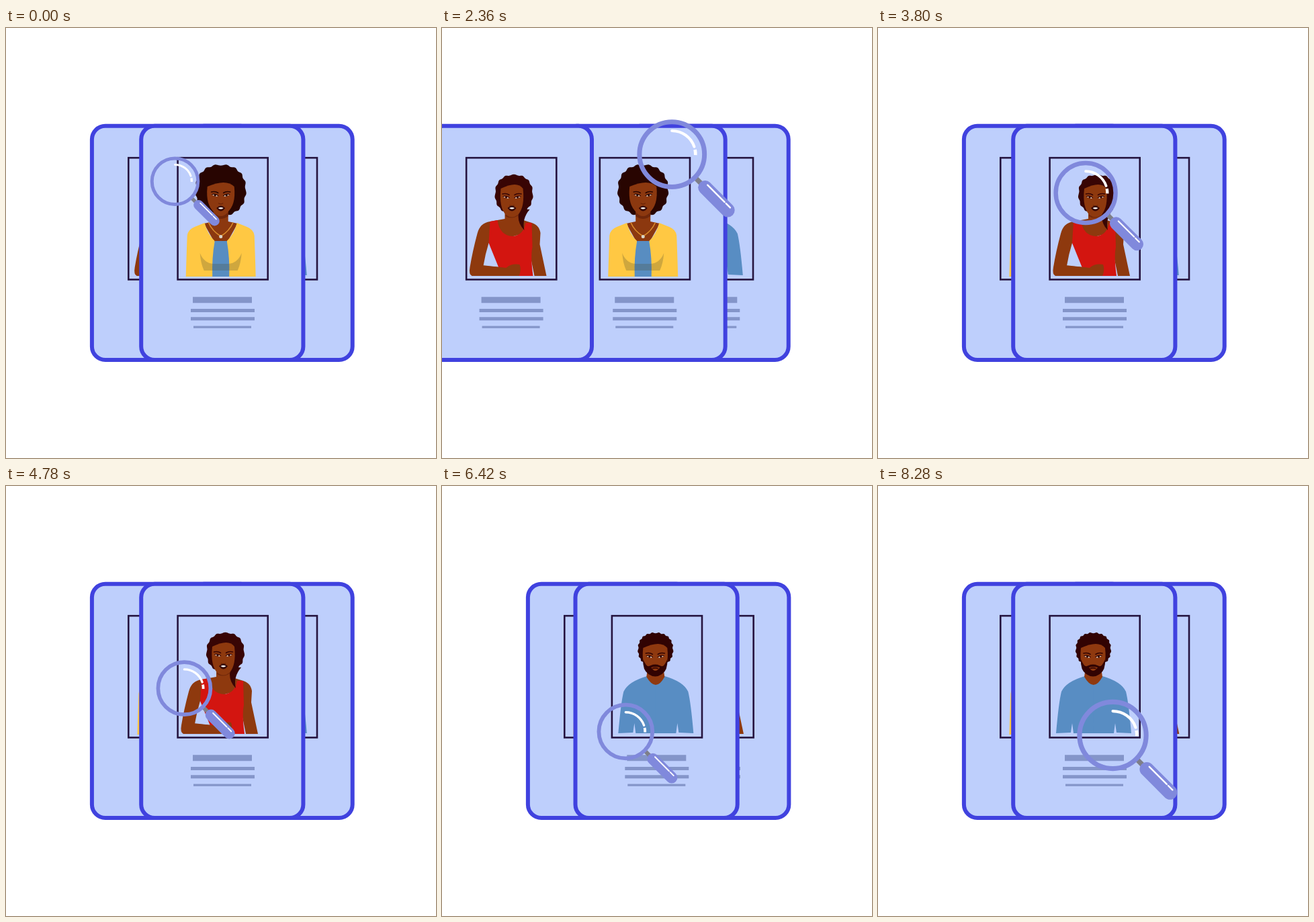
These frames come from a looping animation (640 by 640 pixels, 8480 ms). An HTML page with a canvas:

```html
<!DOCTYPE html>
<html lang="en">
<head>
<meta charset="utf-8">
<title>Profile search</title>
<style>
  html, body { margin: 0; width: 100%; height: 100%; overflow: hidden; background: #fff; }
  canvas { display: block; width: 100%; height: 100%; }
</style>
</head>
<body>
<canvas id="stage" width="640" height="640"></canvas>
<script>
const ctx = document.getElementById('stage').getContext('2d');

const LOOP = 8480;
const SIDE = 73.3;   // resting offset of the cards behind
const AWAY = 306;    // offset of a card pulled clear of the stack
const RED_OUT = 1440, RED_IN = 2190, BLUE_OUT = 4900, BLUE_IN = 5660;

const mix = (a, b, p) => a + (b - a) * p;

// Slightly underdamped spring, peaking 900 ms after its start.
function spring(ms) {
  if (ms <= 0) return 0;
  const x = ms / 900 * Math.PI, damping = 1.3;
  return 1 - Math.exp(-damping * x) * (Math.cos(x) + damping * Math.sin(x));
}

function fill(color, path) {
  ctx.fillStyle = color;
  ctx.fill(new Path2D(path));
}

function line(color, width, path, cap = 'round') {
  ctx.strokeStyle = color;
  ctx.lineWidth = width;
  ctx.lineCap = cap;
  ctx.stroke(new Path2D(path));
}

function dot(color, x, y, r) {
  ctx.beginPath();
  ctx.arc(x, y, r, 0, 7);
  ctx.fillStyle = color;
  ctx.fill();
}

function at(x, y, paint) {
  ctx.save();
  ctx.translate(x, y);
  paint();
  ctx.restore();
}

function mirrored(paint) {
  for (const side of [-1, 1]) {
    ctx.save();
    ctx.scale(side, 1);
    paint();
    ctx.restore();
  }
}

// Rounded-square mass of hair with a wavy outline.
function curlyHair(color, x, y, rx, ry, waves) {
  const bulge = v => Math.sign(v) * Math.abs(v) ** 0.88;
  ctx.beginPath();
  for (let i = 0; i < 180; i++) {
    const a = i * Math.PI / 90;
    const r = 0.98 + 0.025 * Math.sin(waves * a);
    ctx.lineTo(x + rx * r * bulge(Math.cos(a)), y + ry * r * bulge(Math.sin(a)));
  }
  ctx.fillStyle = color;
  ctx.fill();
}

// Origin between the eyes; w is half the width of the head.
function face(skin, hair, w) {
  fill(skin, `M${-w} -13 Q8 -25 ${w} -13 Q${w + 3} 15 9 26 Q0 33 -9 26 Q${-w - 3} 15 ${-w} -13Z`);
  mirrored(() => {
    fill('#e6d8cd', 'M4 1 Q8 -3 13 -1 Q8 3 4 1Z');
    dot(hair, 8.5, 0, 1.7);
    line(hair, 1.2, 'M4 .5 Q8 -3.2 13 -1.3');
    line(hair, 1.6, 'M4 -3.5 Q8 -6.5 14 -5');
  });
  line('#6a2408', 1.4, 'M-3 12 Q0 14 3 12');
}

function mouth(y) {
  fill('#350805', `M-6.5 ${y} Q0 ${y - 7} 6.5 ${y} Q0 ${y + 9} -6.5 ${y}Z`);
  fill('#fff', `M-4 ${y} Q0 ${y - 2} 4 ${y} Q0 ${y + 3} -4 ${y}Z`);
}

function yellowPerson() {
  const hair = '#280501', skin = '#8c380f';
  curlyHair(hair, 319.6, 241.5, 38, 38.5, 17);
  at(319.7, 280, () => {
    fill(skin, 'M-11 -10 H11 V8 L25 11 L10 38 H-10 L-25 11 L-11 8Z');
    fill('#6f270a', 'M-11 -6 Q0 6 11 -6 V0 Q0 8 -11 0Z');
    mirrored(() => fill('#ffc843', 'M24 10 Q20 27 9 37 L12 90 H52 Q51 55 50 29 Q49 20 39 16Z'));
    fill('#588dc1', 'M-9 37 H9 Q13.5 62 12.5 90 H-12.5 Q-13.5 62 -9 37Z');
    fill('rgba(80,80,50,.27)', 'M-31 55 Q-25 70 -11 71 H11 Q25 70 31 55 Q30 70 25 81 H-25 Q-30 70 -31 55Z');
    mirrored(() => line('#d98b2c', 1.6, 'M18 10 Q13 22 0 30'));
    dot('#d8d5c8', 0, 30.5, 2.5);
  });
  at(319.7, 249, () => {
    face(skin, hair, 20);
    mouth(19);
  });
}

function redPerson() {
  const hair = '#380504', skin = '#8e390e';
  curlyHair(hair, 326.5, 247.5, 28.5, 29.5, 15);
  fill(skin, 'M313 268 H334 V284 L350 289 Q364 292 366 305 L365 322 L375 369 H357 L344 305 L289 320 Q284 336 281 354 L320 357 V369 H264 Q259 367 261 356 Q265 332 272 306 Q276 290 291 288 L313 284Z');
  fill('#d31510', 'M291 288 L302 286 Q305 309 325 310 Q341 308 344 290 L353 290 L354 326 Q351 340 355 369 H304 V357 L289 320Z');
  fill(skin, 'M279 353 L315 357 Q323 350 335 352 Q338 360 334 369 H264Z');
  fill('#6f270a', 'M314 272 Q324 283 334 272 V278 Q324 286 314 280Z');
  fill(hair, 'M335 270 H350 Q338 284 342 301 Q333 292 333 280Z');
  at(323.5, 252, () => {
    face(skin, hair, 16.5);
    mouth(16);
  });
}

function bluePerson() {
  const hair = '#310302', skin = '#8f390f';
  at(321, 283, () => mirrored(() =>
    fill('#588dc3', 'M-.5 8 L13 0 Q41 8 48 23 Q52 39 56 85 L34 84 L32 70 L30 85 H-.5Z')));
  fill(skin, 'M309 270 H332 L334 284 Q321 308 307 284Z');
  curlyHair(hair, 320.5, 243.5, 26.5, 25.5, 21);
  at(320, 254, () => {
    face(skin, hair, 18);
    fill(hair, 'M-18 4 Q-13 16 -9 14 Q0 9 9 14 Q13 16 18 4 Q19 20 10 26 Q0 33 -10 26 Q-19 20 -18 4Z');
    fill(skin, 'M-6 16 Q0 14 7 16 Q0 26 -6 16Z');
    line('#3c0904', 1.8, 'M-4 17.5 Q0 16 4 17.5');
  });
}

function card(offset, person, nudge) {
  at(offset, 0, () => {
    ctx.beginPath();
    ctx.roundRect(201.2, 145.8, 241.2, 348.2, 20);
    ctx.fillStyle = '#becffc';
    ctx.fill();
    ctx.strokeStyle = '#4042df';
    ctx.lineWidth = 6;
    ctx.stroke();
    at(nudge, 0, person);
    ctx.strokeStyle = '#25143f';
    ctx.lineWidth = 2.6;
    ctx.strokeRect(255.6, 193.2, 134.1, 181.2);
    line('#8495c9', 9, 'M278 404.8 H366', 'butt');
    line('#8495c9', 5, 'M275 420.5 H370 M275 432.8 H370', 'butt');
    line('#8495c9', 3.2, 'M279 445.2 H365', 'butt');
  });
}

// The lens sweeps between these points; bow curves the leg that follows.
const waypoints = [
  { time: 0, x: 251.5, y: 228.3, r: 36.8, bow: -4 },
  { time: 2720, x: 355, y: 184, r: 54.2, bow: 0 },
  { time: 5490, x: 232.5, y: 341.5, r: 37.6, bow: 16 },
  { time: 8280, x: 349.5, y: 371, r: 53.2 }
];

function lens(t) {
  const next = Math.max(1, waypoints.findIndex(w => w.time > t));
  const leg = t >= 8280 ? 3 : next;
  const a = waypoints[leg - 1], b = waypoints[leg];
  const p = Math.min(1, (t - a.time) / (b.time - a.time));
  const arch = 4 * p * (1 - p);
  const r = mix(a.r, b.r, p);

  ctx.save();
  ctx.translate(mix(a.x, b.x, p) + 2 * arch, mix(a.y, b.y, p) + a.bow * arch);
  ctx.scale(r, r);
  line('#7e7f88', 0.14, 'M.68 .68 L.86 .86', 'butt');
  line('#8089dc', 0.4, 'M.95 .95 L1.6 1.6');
  line('#fff', 0.045, 'M1.02 .88 L1.51 1.37 M1.55 1.41 L1.67 1.53');
  const arc = (color, width, radius, from, to, cap = 'butt') => {
    ctx.beginPath();
    ctx.arc(0, 0, radius, from, to);
    ctx.strokeStyle = color;
    ctx.lineWidth = width;
    ctx.lineCap = cap;
    ctx.stroke();
  };
  arc('#8089dc', 0.135, 0.932, 0, 2 * Math.PI);
  arc('#fff', 0.08, 0.675, -1.57, -0.33, 'round');
  arc('#fff', 0.09, 0.675, -0.2, 0.03);
  ctx.restore();
}

function draw(t) {
  const redOut = spring(t - RED_OUT), redIn = spring(t - RED_IN);
  const blueOut = spring(t - BLUE_OUT), blueIn = spring(t - BLUE_IN);
  const redX = t < RED_IN ? mix(-SIDE, -AWAY, redOut) : mix(-AWAY, 0, redIn) + SIDE * blueIn;
  const blueX = t < BLUE_IN ? mix(SIDE, AWAY, blueOut) : mix(AWAY, 0, blueIn);

  const yellow = [-SIDE * redIn, yellowPerson, redIn];
  const red = [redX, redPerson, 4 * (1 - redOut)];
  const blue = [blueX, bluePerson, -2.5 * (1 - blueIn)];
  const stack = t < RED_IN ? [blue, red, yellow]
    : t < BLUE_IN ? [blue, yellow, red]
    : [yellow, red, blue];

  ctx.fillStyle = '#fff';
  ctx.fillRect(0, 0, 640, 640);
  for (const layer of stack) card(...layer);
  lens(t);
}

const start = performance.now();
function tick() {
  draw((performance.now() - start) % LOOP);
  requestAnimationFrame(tick);
}
tick();
</script>
</body>
</html>
```
